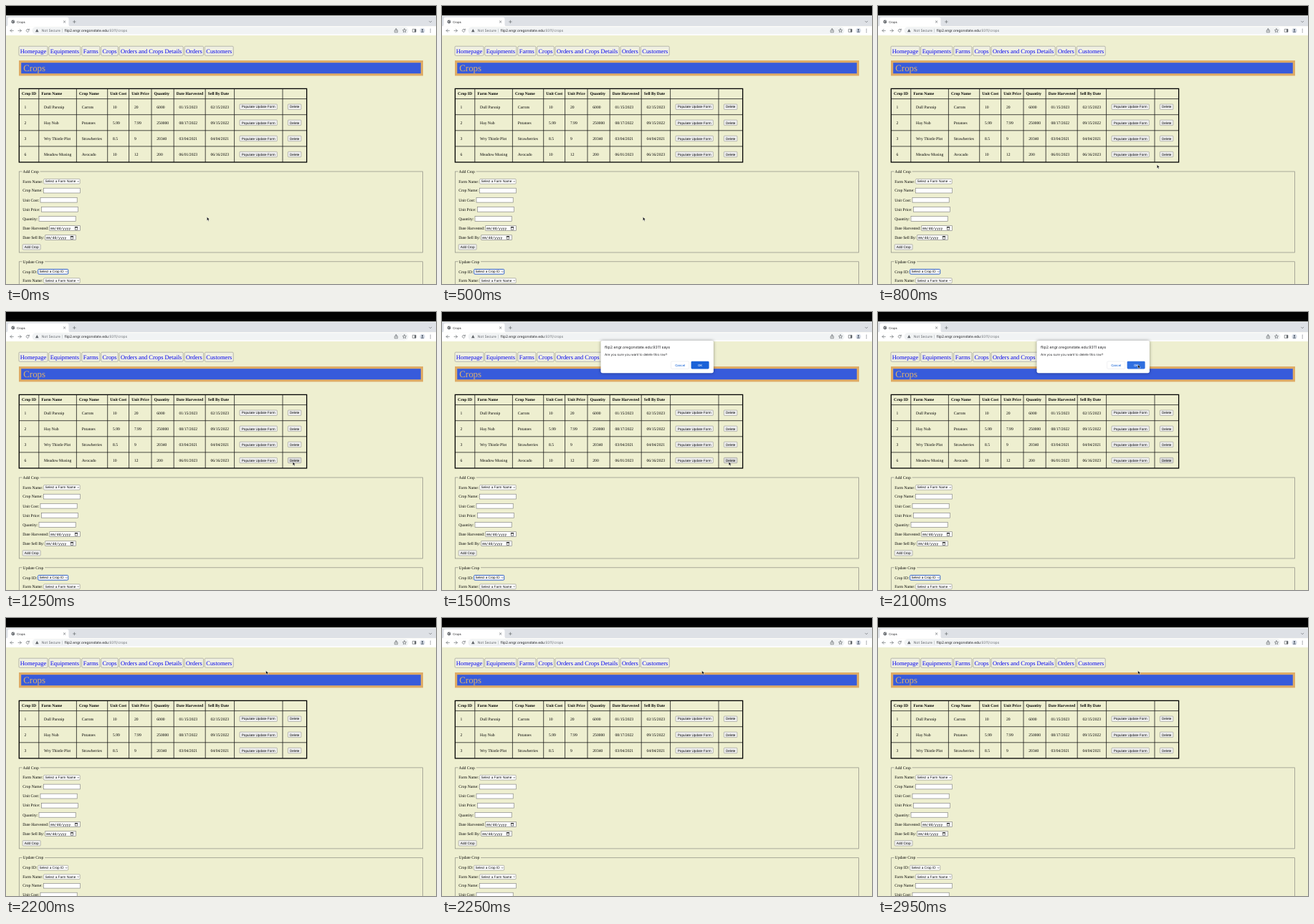
Write an HTML page that moves like this. It is 600 px wide and 388 px high and loops after 3000 ms.

```html
<!DOCTYPE html>
<html lang="en">
<head>
<meta charset="utf-8">
<title>Crops</title>
<style>
  html, body { margin: 0; width: 100%; height: 100%; overflow: hidden; background: #eeefd0; }
  svg { display: block; width: 100vw; height: 100vh; }
  text { text-rendering: geometricPrecision; white-space: pre; }
  .serif { font-family: "Liberation Serif", Times, serif; font-size: 5.624px; }
  .bold { font-weight: bold; }
  .nav { font-family: "Liberation Serif", Times, serif; font-size: 8.43px; fill: #0000ee; }
  .title { font-family: "Liberation Serif", Times, serif; font-size: 12.95px; fill: #deb06c; }
  .control { font-family: "Liberation Sans", Arial, sans-serif; font-size: 4.687px; }
  .date { font-family: "DejaVu Sans Mono", monospace; font-size: 4.687px; }
  .ui { font-family: Inter, Roboto, sans-serif; fill: #202124; }
  .mid { text-anchor: middle; }
  .icon { fill: none; stroke: #5f6368; stroke-width: .65; stroke-linecap: round; stroke-linejoin: round; }
</style>
</head>
<body>
<svg id="stage" viewBox="0 0 600 388" xmlns="http://www.w3.org/2000/svg"></svg>
<script>
const LOOP = 3000;
const ROW_HEIGHT = 22.1;
const TABLE = { left: 18.3, right: 419.6, top: 115.4, headBottom: 129.6 };
const COLUMNS = [45.8, 98.4, 141.7, 171.6, 203, 234.2, 278.2, 318.6, 386];
const BORDER = "#767676";

const text = (x, y, s, cls, extra = "") => `<text x="${x}" y="${y}" class="${cls}" ${extra}>${s}</text>`;
const rect = (x, y, w, h, fill, extra = "") =>
  `<rect x="${x}" y="${y}" width="${w}" height="${h}" fill="${fill}" ${extra}/>`;
const path = (d, extra = 'class="icon"') => `<path d="${d}" ${extra}/>`;
const group = (id, body) => `<g id="${id}">${body}</g>`;

function button(x, cy, w, label, id = "") {
  return rect(x, cy - 3.75, w, 7.5, "#efefef", `id="${id}" rx="1" stroke="${BORDER}" stroke-width=".45"`) +
    text(x + w / 2, cy + 1.65, label, "control mid");
}

function select(x, cy, w, label, id = "") {
  const right = x + w;
  return rect(x, cy - 3.4, w, 6.8, "#fff", `id="${id}" rx="1" stroke="${BORDER}" stroke-width=".5"`) +
    text(x + 1.7, cy + 1.65, label, "control") +
    path(`M${right - 3.6} ${cy - .6}l1.1 1.2l1.1 -1.2`, 'fill="none" stroke="#222" stroke-width=".6"');
}

const input = (x, cy, w) => rect(x, cy - 3.4, w, 6.8, "#fff", `stroke="${BORDER}" stroke-width=".6"`);

function dateInput(x, cy) {
  const icon = x + 35.4;
  return input(x, cy, 42.6) + text(x + 1.4, cy + 1.6, "mm/dd/yyyy", "date") +
    rect(icon, cy - 1.7, 3.6, 3.7, "none", 'stroke="#111" stroke-width=".5"') +
    rect(icon, cy - 1.9, 3.6, 1.2, "#111");
}

const label = (cy, s) => text(23.2, cy + 1.8, s, "serif");

function fieldset(top, height, legend, legendWidth) {
  return rect(18.3, top, 563.2, height, "none", 'stroke="#8b8b80" stroke-width=".7"') +
    rect(22.6, top - 3, legendWidth, 6, "#eeefd0") + text(23.6, top + 1.8, legend, "serif");
}

function browser() {
  return rect(0, 0, 600, 13.3, "#000") + rect(0, 13.3, 600, 15, "#dee1e6") +
    path("M0 28.4Q2.5 28.4 2.5 26V18Q2.5 15.8 4.8 15.8H85.2Q87.5 15.8 87.5 18V26Q87.5 28.4 90 28.4Z", 'fill="#fff"') +
    `<circle cx="9.8" cy="22" r="2.4" fill="#5f6368"/>` +
    path("M8.3 21.3l1.5 .5l-.4 1.4M10.4 20.2l1 1.3", 'fill="none" stroke="#fff" stroke-width=".6"') +
    text(15, 23.6, "Crops", "ui", 'font-size="4.15"') +
    path("M80.3 20.7l2.6 2.6m0-2.6l-2.6 2.6M95.4 20.2v3.6m-1.8-1.8h3.6M590.6 21.2l1.6 1.6l1.6-1.6") +
    rect(0, 28.2, 600, 12.8, "#fff") +
    rect(36.5, 29.2, 525, 10.2, "#f1f3f4", 'rx="5.1"') +
    path("M10.3 34.4H6m2-2l-2 2l2 2M17 34.4h4.3m-2-2l2 2l-2 2M32 33.2a2 2 0 1 0 .1 2M32.3 32v1.6h-1.6") +
    path("M43.3 32.1l2.3 4.2h-4.6z", 'fill="#5f6368"') +
    text(49.8, 36.1, "Not Secure", "ui", 'font-size="4.92" style="fill:#5f6368"') +
    rect(78.6, 31.8, .4, 5, "#9aa0a6") +
    text(81.8, 36.1, 'flip2.engr.oregonstate.edu<tspan fill="#6b7075">:9311/crops</tspan>', "ui", 'font-size="4.9"') +
    path("M543.2 33.8h-1v3h4.2v-3h-1M544.3 35.4v-3.8m-1.2 1.2l1.2-1.2l1.2 1.2") +
    path("M556 31.7l.8 1.7l1.8 .2l-1.3 1.2l.4 1.8l-1.7-.9l-1.6 .9l.3-1.8l-1.3-1.2l1.8-.2z") +
    path("M567.6 32.3h4.4v4h-4.4z") + rect(570, 32.3, 2, 4, "#5f6368") +
    `<circle cx="581" cy="34.3" r="3.5" fill="#d5dbe5"/><circle cx="581" cy="33.3" r="1.1" fill="#3f4a5a"/>` +
    path("M578.8 36.5q2.2-2.6 4.4 0z", 'fill="#3f4a5a"') +
    [32.3, 34.3, 36.3].map(y => `<circle cx="592.2" cy="${y}" r=".6" fill="#5f6368"/>`).join("");
}

function header() {
  const links = [["Homepage", 18, 40], ["Equipments", 59.8, 44], ["Farms", 105.8, 25], ["Crops", 132.7, 23.7],
    ["Orders and Crops Details", 158.2, 89], ["Orders", 249.2, 26.3], ["Customers", 277.4, 39.8]];
  return links.map(([name, x, w]) =>
    rect(x, 56.2, w, 13, "#f0f0e2", 'rx="1.2" stroke="#8a8a86" stroke-width=".55"') +
    text(x + w / 2, 65.5, name, "nav mid")).join("") +
    rect(18, 76, 564, 21.4, "#deab66") + rect(21.2, 79.2, 557.6, 15, "#375bdb") +
    text(24.2, 91.1, "Crops", "title");
}

function verticals(top, bottom) {
  return path(COLUMNS.map(x => `M${x} ${top}V${bottom}`).join(""), 'stroke="#111" stroke-width=".75"');
}

function tableRow(cells, index) {
  const top = TABLE.headBottom + index * ROW_HEIGHT;
  const mid = top + ROW_HEIGHT / 2;
  const starts = [TABLE.left, ...COLUMNS];
  return group("row" + index,
    path(`M${TABLE.left} ${top}H${TABLE.right}`, 'stroke="#111" stroke-width=".75"') +
    verticals(top, top + ROW_HEIGHT) +
    cells.map((s, i) => text(starts[i] + 7.3, mid + 1.85, s, "serif")).join("") +
    button(326, mid + .1, 52.4, "Populate Update Form") +
    button(393.4, mid + .1, 18.5, "Delete", "delete" + index));
}

function table() {
  const heads = ["Crop ID", "Farm Name", "Crop Name", "Unit Cost", "Unit Price", "Quantity", "Date Harvested", "Sell By Date"];
  const rows = [
    ["1", "Dull Parsnip", "Carrots", "10", "20", "6000", "01/15/2023", "02/15/2023"],
    ["2", "Hay Nub", "Potatoes", "5.99", "7.99", "250000", "08/17/2022", "09/15/2022"],
    ["3", "Wry Thistle Plot", "Strawberries", "8.5", "9", "20340", "03/04/2021", "04/04/2021"],
    ["6", "Meadow Musing", "Avocado", "10", "12", "200", "06/01/2023", "06/16/2023"]
  ];
  const starts = [TABLE.left + .2, ...COLUMNS];
  return verticals(TABLE.top, TABLE.headBottom) +
    heads.map((s, i) => text(starts[i] + 3.6, 124.4, s, "serif bold")).join("") +
    rows.map(tableRow).join("") +
    rect(TABLE.left, TABLE.top, TABLE.right - TABLE.left, 0, "none", 'id="frame" stroke="#000" stroke-width="1.3"');
}

function forms() {
  return fieldset(231, 113, "Add Crop", 25) +
    label(244.8, "Farm Name:") + select(52.7, 244.8, 50.5, "Select a Farm Name") +
    label(257.6, "Crop Name:") + input(52.4, 257.6, 51.2) +
    label(270.7, "Unit Cost:") + input(48, 270.7, 51.2) +
    label(283.8, "Unit Price:") + input(49.4, 283.8, 51.2) +
    label(296.9, "Quantity:") + input(46, 296.9, 51.2) +
    label(310.1, "Date Harvested:") + dateInput(60.8, 310.1) +
    label(323.2, "Date Sell By:") + dateInput(54.8, 323.2) +
    button(23.2, 336.4, 25, "Add Crop") +
    fieldset(356.8, 160, "Update Crop", 31.5) +
    label(370.8, "Crop ID:") + select(44.7, 370.8, 42, "Select a Crop ID", "cropSelect") +
    label(383.3, "Farm Name:") + select(52.7, 383.3, 50.5, "Select a Farm Name") +
    label(395.8, "Crop Name:") + input(52.4, 395.8, 51.2) +
    label(408.7, "Unit Cost:") + input(48, 408.7, 51.2);
}

function dialog() {
  return rect(221.5, 40, 157.4, 45.2, "#fff", 'rx="2.6" style="filter:drop-shadow(0 .8px 2px rgba(0,0,0,.4))"') +
    text(227, 50.7, "flip2.engr.oregonstate.edu:9311 says", "ui", 'font-size="5.27"') +
    text(227, 60.9, "Are you sure you want to delete this row?", "ui", 'font-size="4.48"') +
    rect(319.6, 68.9, 25.2, 10.4, "#fff", 'rx="1.4" stroke="#dadce0" stroke-width=".4"') +
    text(332.2, 75.6, "Cancel", "ui mid", 'font-size="4.25" font-weight="500" style="fill:#1a66d6"') +
    rect(347.6, 68.7, 25, 10.8, "#1a62d8", 'id="ok" rx="1.4"') +
    text(360.1, 75.6, "OK", "ui mid", 'font-size="4.25" font-weight="500" style="fill:#fff"');
}

const pointer = path("M0 0V4.9L1.15 3.85L1.95 5.7L2.85 5.3L2.05 3.5H3.6Z",
  'fill="#000" stroke="#fff" stroke-width=".45" stroke-linejoin="round"');

const stage = document.getElementById("stage");
stage.innerHTML = rect(0, 0, 600, 388, "#eeefd0") + header() + table() + group("forms", forms()) +
  browser() + group("dialog", dialog()) + group("cursor", pointer);

const $ = id => document.getElementById(id);
const show = (id, visible) => $(id).setAttribute("visibility", visible ? "visible" : "hidden");

function ease(t, start, duration) {
  const u = Math.min(1, Math.max(0, (t - start) / duration));
  return u < .5 ? 4 * u ** 3 : 1 - 4 * (1 - u) ** 3;
}

function render(t) {
  const x = 280.4 + 119.8 * ease(t, 500, 420) - 37.5 * ease(t, 1550, 490);
  const y = 294.6 - 85.4 * ease(t, 500, 450) - 135.6 * ease(t, 1550, 490);
  $("cursor").setAttribute("transform", `translate(${x.toFixed(2)} ${y.toFixed(2)})`);

  const deleted = t >= 2200;
  show("dialog", t >= 1400 && t < 2150);
  show("row3", !deleted);
  $("frame").setAttribute("height", 14.2 + ROW_HEIGHT * (deleted ? 3 : 4));
  $("forms").setAttribute("transform", `translate(0 ${deleted ? -ROW_HEIGHT : 0})`);
  $("delete3").setAttribute("fill", t >= 860 ? "#dcdcdc" : "#efefef");
  $("ok").setAttribute("fill", t >= 2000 ? "#2f6fe0" : "#1a62d8");
  $("cropSelect").setAttribute("stroke", deleted ? BORDER : "#2f5fc4");
  $("cropSelect").setAttribute("stroke-width", deleted ? .5 : 1);
}

const start = performance.now();
function tick() {
  render((performance.now() - start) % LOOP);
  requestAnimationFrame(tick);
}
tick();
</script>
</body>
</html>
```
